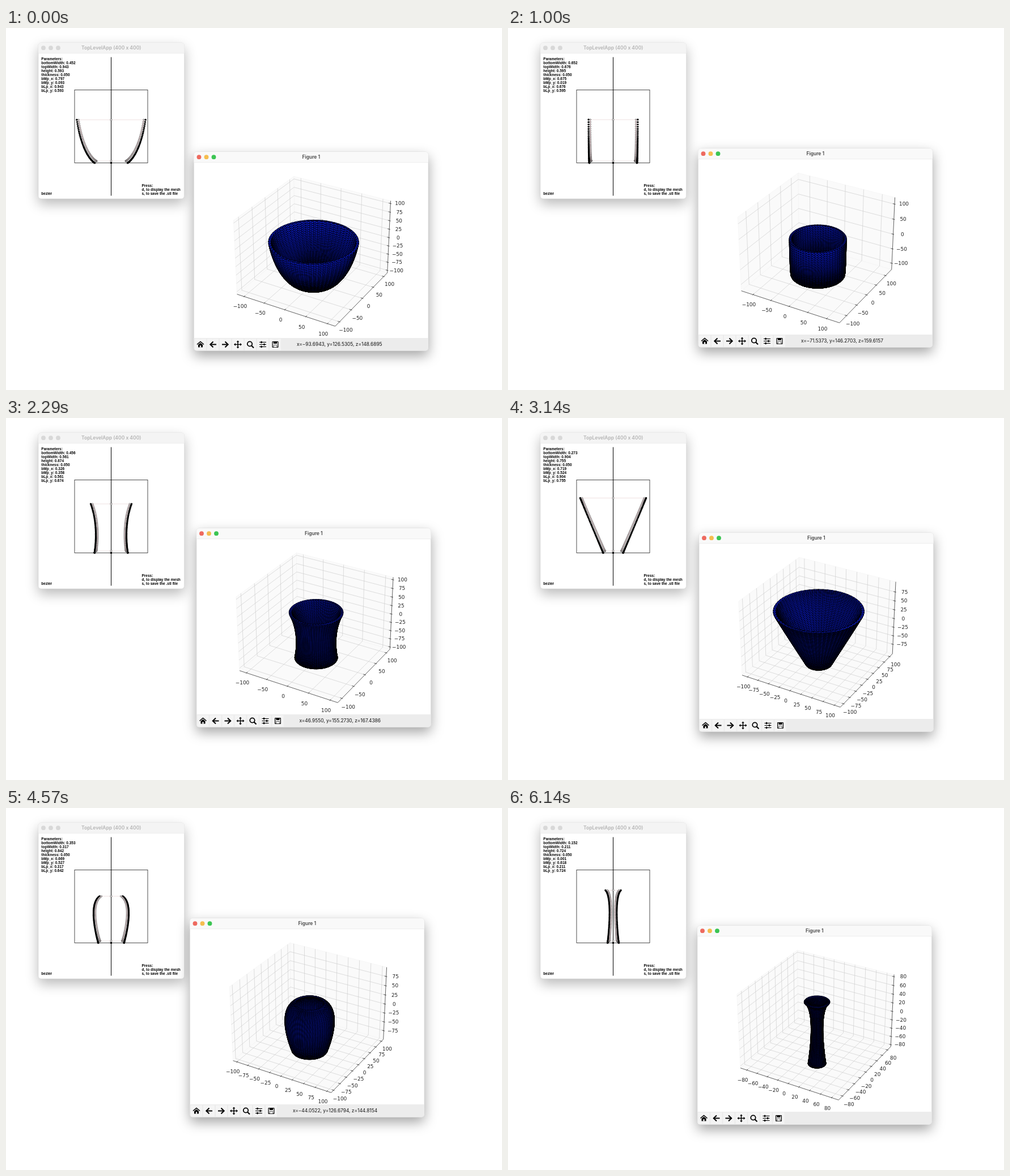
Recreate the animation shown at these times as an HTML page with a canvas. Size 875 by 640 pixels, loop 6290 ms.

```html
<!DOCTYPE html>
<html lang="en">
<head>
<meta charset="utf-8">
<title>Bowl designer</title>
<style>
  html, body { margin: 0; width: 100%; height: 100%; overflow: hidden; background: #fff; }
  canvas { display: block; }
</style>
</head>
<body>
<canvas id="stage" width="875" height="640"></canvas>
<script>
const ctx = document.getElementById('stage').getContext('2d');
const LOOP = 6290, FPS = 7, TAU = Math.PI * 2;
const SANS = 'Inter, sans-serif', BOLD = '"Liberation Sans", Arial, sans-serif', PLOT = '"DejaVu Sans", sans-serif';
const ROWS = 50, COLUMNS = 60, THICKNESS = .05;

// Key designs: window corner, bottom width, top [width, height], middle control point
const designs = [
  { tick: 0, corner: [331.5, 219], bottom: .452, top: [.943, .593], mid: [.797, .093], cursor: 'x=−93.6943, y=126.5305, z=148.6895' },
  { tick: 7, corner: [335.5, 213], bottom: .652, top: [.676, .595], mid: [.675, .019], cursor: 'x=−71.5373, y=146.2703, z=159.6157' },
  { tick: 16, corner: [336, 195], bottom: .456, top: [.561, .674], mid: [.326, .358], cursor: 'x=46.9550, y=155.2730, z=167.4386' },
  { tick: 22, corner: [337, 203], bottom: .273, top: [.904, .755], mid: [.719, .524], cursor: '' },
  { tick: 26, corner: [328.5, 210], bottom: .782, top: [.921, .766], mid: [.362, .415], cursor: '' },
  { tick: 32, corner: [324.5, 195], bottom: .353, top: [.317, .642], mid: [.669, .527], cursor: 'x=−44.0522, y=126.6794, z=144.8154' },
  { tick: 41, corner: [334, 208], bottom: .152, top: [.211, .724], mid: [.001, .618], cursor: '' }
];
const isPause = tick => tick === 6 || tick === 10 || (tick > 26 && tick < 30);

const mix = (a, b, f) => Array.isArray(a) ? a.map((v, i) => mix(v, b[i], f)) : a + (b - a) * f;
const range = (n, fn) => Array.from({ length: n }, (_, i) => fn(i));

function stateAt(tick) {
  while (isPause(tick)) tick--;
  const i = designs.findLastIndex(d => d.tick <= tick);
  const a = designs[i], b = designs[i + 1] || a;
  const f = a === b ? 0 : (tick - a.tick) / (b.tick - a.tick);
  const s = { cursor: (f < .5 ? a : b).cursor };
  for (const key of ['corner', 'bottom', 'top', 'mid']) s[key] = mix(a[key], b[key], f);
  [s.x, s.y] = s.corner.map(v => Math.round(v * 2) / 2);
  s.limit = Math.max(125 * s.top[0], 80.4 + 81 * s.bottom);
  s.zLimit = s.limit / 1.095;
  return s;
}

// Wall outlines as [radius, z]: a cubic Bezier whose first two points coincide at the base
function walls({ bottom, top, mid }) {
  const curve = (axis, start, t) =>
    start * (1 - t) ** 2 * (1 + 2 * t) + mid[axis] * 3 * t * t * (1 - t) + top[axis] * t ** 3;
  const outer = range(ROWS + 1, i => [100 * curve(0, bottom, i / ROWS), 200 * curve(1, 0, i / ROWS)]);
  const wall = 100 * THICKNESS;
  const inner = outer.map(([r, z]) => [r - wall, z + wall * (1 - z / (200 * top[1]))]);
  return { outer, inner };
}

function text(str, x, y, font, color = '#000', align = 'left') {
  ctx.font = font;
  ctx.fillStyle = color;
  ctx.textAlign = align;
  ctx.textBaseline = 'middle';
  ctx.fillText(str, x, y);
}

function path(points, stroke, width = 1, fill) {
  ctx.beginPath();
  points.forEach(p => ctx.lineTo(p[0], p[1]));
  if (fill) { ctx.closePath(); ctx.fillStyle = fill; ctx.fill(); }
  if (stroke) { ctx.strokeStyle = stroke; ctx.lineWidth = width; ctx.stroke(); }
}

function dot(x, y, r, fill, stroke, width = .6) {
  ctx.beginPath();
  ctx.arc(x, y, r, 0, TAU);
  if (fill) { ctx.fillStyle = fill; ctx.fill(); }
  if (stroke) { ctx.strokeStyle = stroke; ctx.lineWidth = width; ctx.stroke(); }
}

function box(x, y, w, h, radius, fill, stroke) {
  ctx.beginPath();
  ctx.roundRect(x, y, w, h, radius);
  ctx.fillStyle = fill;
  ctx.fill();
  if (stroke) { ctx.strokeStyle = stroke; ctx.lineWidth = .6; ctx.stroke(); }
}

function drawWindow(x, y, w, h, shadow, barColor, title, titleColor, lights) {
  ctx.save();
  ctx.shadowColor = `rgba(0,0,0,${shadow})`;
  ctx.shadowBlur = 22;
  ctx.shadowOffsetY = 9;
  box(x, y, w, h, 5, '#fff');
  ctx.restore();
  box(x, y, w, h, 5, '#fff', '#d4d4d4');
  box(x, y, w, 18.7, [5, 5, 0, 0], barColor);
  path([[x, y + 18.7], [x + w, y + 18.7]], '#e8e8e8', .7);
  lights.forEach((c, i) => dot(x + 9 + 13 * i, y + 9.2, 3.9, c));
  text(title, x + w / 2, y + 9.3, `600 8.5px ${SANS}`, titleColor, 'center');
}

function drawEditor(s) {
  drawWindow(57, 26, 257.5, 276, .28, '#f4f4f4', 'TopLevelApp (400 x 400)', '#b4b4b4', Array(3).fill('#d8d8d8'));
  const cx = 185.5, base = 238.5, unit = .6425;
  const { outer, inner } = walls(s);
  const place = side => ([r, z]) => [cx + side * r * unit, base - z * unit];

  for (const i of [0, ROWS]) path([-1, 1].map(side => place(side)(inner[i])), '#e8d4d4', .7);
  ctx.strokeStyle = '#222';
  ctx.lineWidth = .8;
  ctx.strokeRect(121, 109.5, 129, 129);
  path([[cx, 51.5], [cx, 296.5]], '#000', 1);
  for (const side of [-1, 1]) {
    const lining = inner.map(place(side));
    outer.map(place(side)).forEach(p => dot(...p, 1.7, '#000'));
    lining.forEach(p => dot(...p, 1.25, '#fff', '#333'));
    path(lining, '#d49aa0', .5);
  }
  for (const i of [0, ROWS]) dot(cx, place(1)(inner[i])[1], 1.5, '#fff', '#222');
  dot(cx, base, 1.8, '#000');

  const values = { bottomWidth: s.bottom, topWidth: s.top[0], height: s.top[1], thickness: THICKNESS,
                   bMp_x: s.mid[0], bMp_y: s.mid[1], bLp_x: s.top[0], bLp_y: s.top[1] };
  const note = (lines, x, y) => lines.forEach((line, i) => text(line, x, y + 7.08 * i, `bold 6.5px ${BOLD}`));
  note(['Parameters:', ...Object.entries(values).map(([k, v]) => `${k}: ${v.toFixed(3)}`)], 62.3, 55);
  note(['Press:', 'd, to display the mesh', 's, to save the .stl file'], 239.5, 279.3);
  note(['bezier'], 62.3, 293.5);
}

// Toolbar icons, each centred on the origin
function arrow(turn) {
  ctx.rotate(turn);
  path([[6, 0], [-5, 0]], '#000', 2);
  path([[.5, -5], [-4.7, 0], [.5, 5]], '#000', 2);
}
const icons = [
  function home() {
    path([[-6, 0], [0, -5], [6, 0]], '#000', 1.6);
    path([[-4, 5], [-4, .6], [0, -2.8], [4, .6], [4, 5]], null, 0, '#000');
    box(-1.2, 1.8, 2.4, 3.4, 0, '#f4f4f4');
  },
  () => arrow(0),
  () => arrow(TAU / 2),
  function pan() {
    for (let i = 0; i < 4; i++) {
      path([[0, 0], [0, -5]], '#000', 1.5);
      path([[-2.4, -4.2], [0, -7], [2.4, -4.2]], null, 0, '#000');
      ctx.rotate(TAU / 4);
    }
  },
  function zoom() {
    dot(-1, -1, 4.2, null, '#000', 1.8);
    path([[2, 2], [6, 6]], '#000', 2.2);
  },
  function sliders() {
    for (let i = -1; i <= 1; i++) {
      path([[-6, 4 * i], [6, 4 * i]], '#000', 1.1);
      box(2.5 * Math.cos(i * Math.PI) - 1, 4 * i - 1.7, 2.2, 3.4, 0, '#000');
    }
  },
  function save() {
    box(-5.5, -5.5, 11, 11, 1, '#000');
    box(-4.3, -4.3, 8.6, 8.6, 0, '#f4f4f4');
    box(-3, -5, 6, 3.6, 0, '#000');
    box(-2.8, 1, 5.6, 4, 0, '#f4f4f4', '#000');
  }
];

function drawToolbar(s) {
  box(s.x, s.y + 329, 413.5, 22.5, [0, 0, 5, 5], '#ececec');
  icons.forEach((icon, i) => {
    ctx.save();
    ctx.translate(s.x + 11.5 + 22 * i, s.y + 340.5);
    box(-10, -10, 20, 20, 0, '#f4f4f4');
    icon();
    ctx.restore();
  });
  text(s.cursor, s.x + 181.5, s.y + 340.5, `8.4px ${SANS}`, '#111');
}

// Perspective view from elevation 30°, azimuth -60°; each coordinate runs -1..1 within the axes
function camera(s) {
  const sinE = Math.sin(TAU / 12), cosE = Math.cos(TAU / 12), sinA = -cosE, cosA = sinE;
  const ox = s.x + 211.1, oy = s.y + 169.4, size = .595;
  return ([x, y, z]) => {
    x *= size; y *= size; z *= size * .75;
    const ahead = x * cosA + y * sinA;
    const depth = 10 - ahead * cosE - z * sinE, k = 1667 / depth;
    return [ox + k * (y * cosA - x * sinA), oy + k * (ahead * sinE - z * cosE), depth];
  };
}

function ticks(limit) {
  const max = limit * .96;
  const step = [20, 25, 50].find(n => 2 * max / n <= 9);
  const n = Math.floor(max / step);
  return range(2 * n + 1, i => (i - n) * step);
}

function drawAxes(s, cam) {
  const line = (points, ...style) => path(points.map(cam), ...style);
  const square = [[-1, -1], [1, -1], [1, 1], [-1, 1]];
  for (const pane of [(a, b) => [a, b, -1], (a, b) => [-1, a, b], (a, b) => [a, 1, b]])
    line(square.map(([a, b]) => pane(a, b)), '#f0f0f0', .5, '#fafafa');

  // Every grid line starts on its axis; labels sit a little outside it
  const axes = [
    { limit: s.limit, grid: v => [[v, -1, -1], [v, 1, -1], [v, 1, 1]], label: v => [v, -1.14, -1.185] },
    { limit: s.limit, grid: v => [[1, v, -1], [-1, v, -1], [-1, v, 1]], label: v => [1.125, v, -1.185] },
    { limit: s.zLimit, grid: v => [[1, 1, v], [-1, 1, v], [-1, -1, v]], label: v => [1.15, 1.07, v] }
  ];
  const eachTick = fn => axes.forEach(a => ticks(a.limit).forEach(v => fn(a, v / a.limit, v)));
  eachTick((a, v) => line(a.grid(v), '#c8c8c8', .6));
  line([[-1, -1, -1], [1, -1, -1], [1, 1, -1], [1, 1, 1]], '#222', .7);
  eachTick((a, v, value) => {
    const [from, to] = a.grid(v);
    line([mix(from, to, -.009), mix(from, to, .0175)], '#222', .7);
    const [x, y] = cam(a.label(v));
    text(String(value).replace('-', '−'), x, y, `8.9px ${PLOT}`, '#222', 'center');
  });
}

// Revolves the closed wall outline and paints it from back to front
function drawMesh(s, cam) {
  const { outer, inner } = walls(s);
  const rings = [[0, 0], ...outer, ...inner.reverse(), [0, 100 * THICKNESS]].map(([r, z]) =>
    range(COLUMNS, j => {
      const a = TAU * j / COLUMNS;
      return cam([r * Math.cos(a) / s.limit, r * Math.sin(a) / s.limit, (z - 100) / s.zLimit]);
    }));
  const quads = rings.slice(1).flatMap((ring, i) => ring.map((p, j) => {
    const k = (j + 1) % COLUMNS;
    return [rings[i][j], rings[i][k], ring[k], p];
  }));
  const depth = q => q.reduce((sum, p) => sum + p[2], 0);
  quads.sort((a, b) => depth(b) - depth(a));
  ctx.lineJoin = 'round';
  for (const q of quads) path([...q, q[0], q[2]], '#000', .65, '#0c1ddc');
  ctx.lineJoin = 'miter';
}

function drawFigure(s) {
  drawWindow(s.x, s.y, 413.5, 351.5, .36, '#f9f9f9', 'Figure 1', '#444', ['#ee6a5f', '#f5bd4f', '#3cc553']);
  const cam = camera(s);
  drawAxes(s, cam);
  drawMesh(s, cam);
  drawToolbar(s);
}

let shown = -1;
function frame(now) {
  const tick = Math.min(43, Math.floor((now % LOOP + 5) * FPS / 1000));
  if (tick !== shown) {
    shown = tick;
    const s = stateAt(tick);
    box(0, 0, 875, 640, 0, '#fff');
    drawEditor(s);
    drawFigure(s);
  }
  requestAnimationFrame(frame);
}
requestAnimationFrame(frame);
</script>
</body>
</html>
```
